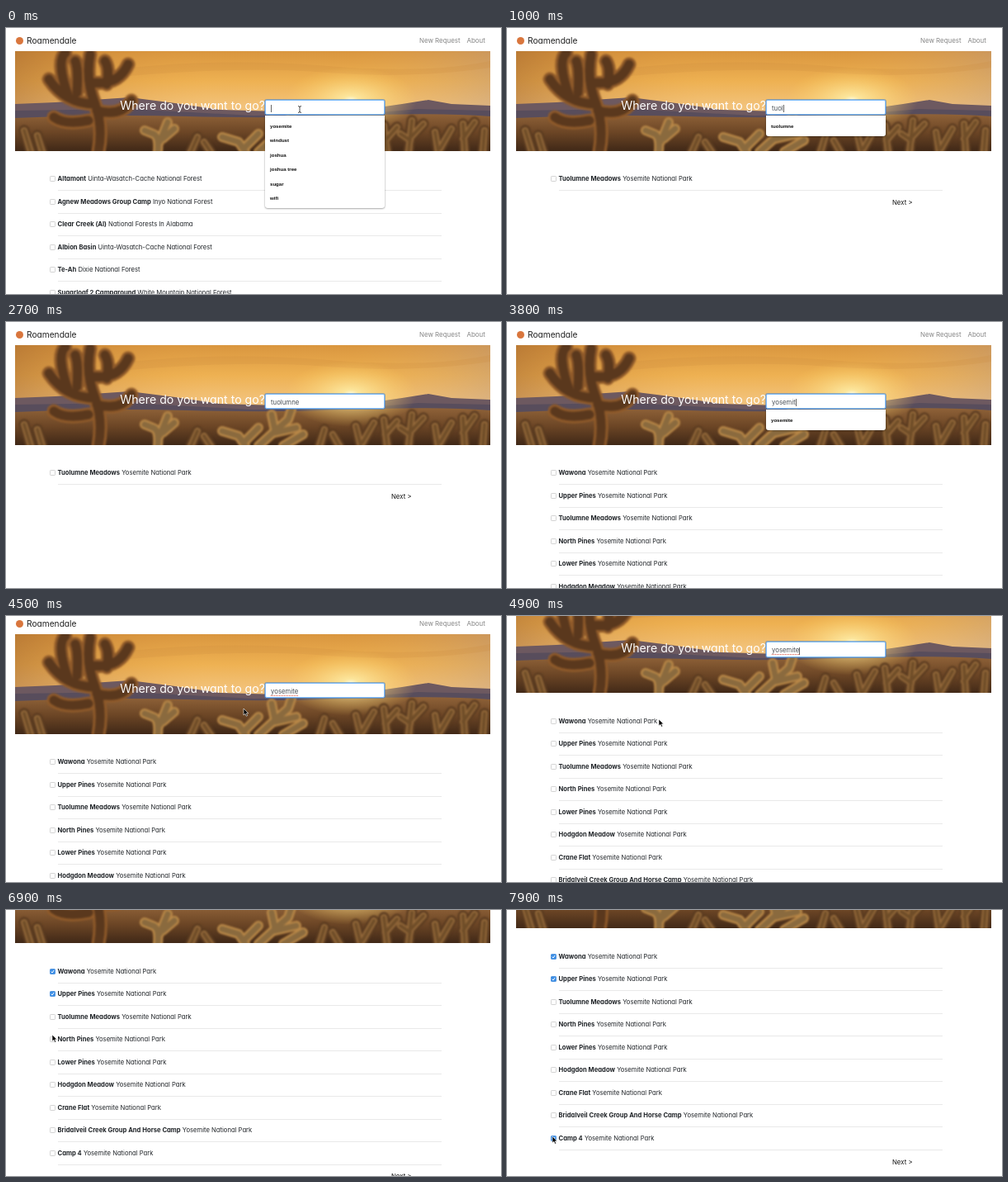
Write an HTML page that moves like this. It is 600 px wide and 322 px high and loops after 8000 ms.

```html
<!DOCTYPE html>
<html lang="en">
<head>
<meta charset="utf-8">
<title>Campground search</title>
<style>
html, body { margin: 0; width: 100%; height: 100%; overflow: hidden; background: #fff; }
#stage { position: relative; width: 600px; height: 322px; overflow: hidden;
  font: 7.65px Inter, "Open Sans", sans-serif; font-feature-settings: "cv11"; color: #212529; }
#page, #page > *, .row > *, #cursor, #beam { position: absolute; white-space: nowrap; }
#page { left: 0; top: 0; width: 600px; height: 500px; }
.nav { top: 5px; line-height: 20px; font-size: 7.9px; color: #858585; }
#brand { left: 25px; font-size: 10.2px; color: #222; }
#logo { left: 12px; top: 10.5px; width: 9px; height: 9px; border-radius: 50%; background: #d9763d; }
#photo { left: 11px; top: 28px; width: 576px; height: 120.5px; }
#ask { right: 286px; top: 84px; line-height: 20px; font-size: 14.15px; color: #fff; }
#field { left: 314px; top: 86.5px; width: 145px; height: 18.5px; box-sizing: border-box; padding-left: 6px;
  border: .5px solid #ced4da; border-radius: 2px; background: #fff; line-height: 18px; font-size: 7.8px; color: #495057; }
#field.focus { border-color: #80bdff; box-shadow: 0 0 0 1px rgba(70, 130, 200, .55); }
#typed.spell { text-decoration: underline dotted #e0533f 1px; text-underline-offset: 1.5px; }
#caret { display: inline-block; width: .7px; height: 9px; background: #666; vertical-align: middle; }
#list { left: 0; top: 0; }
#menu { left: 314px; top: 106px; width: 145px; box-sizing: border-box; padding: 4px 0 3.6px 6px; background: #fff;
  border-radius: 0 0 3px 3px; box-shadow: 0 .5px 2px rgba(0, 0, 0, .5);
  font: bold 6.1px/17.4px "Liberation Sans", Arial, sans-serif; color: #111; }
.row { position: absolute; left: 0; width: 600px; height: 27.5px; }
.row svg { left: 52.5px; top: 10px; width: 7px; height: 7px; }
.row span { left: 62.5px; top: 0; line-height: 27.5px; }
.row hr { left: 63px; top: 27px; width: 465px; height: 1px; margin: 0; border: 0; background: #e9e9e9; }
#next { left: 467px; line-height: 20px; font-size: 7.8px; color: #111; }
</style>
</head>
<body>
<div id="stage">
  <div id="page">
    <div id="logo"></div>
    <div id="brand" class="nav">Roamendale</div>
    <div class="nav" style="left:501px">New Request</div>
    <div class="nav" style="left:558.5px">About</div>
    <svg id="photo" viewBox="11 28 576 120.5" preserveAspectRatio="none">
      <defs>
        <linearGradient id="sky" x2="0" y2="1">
          <stop stop-color="#d9963f"/><stop offset=".3" stop-color="#eeb152"/><stop offset=".55" stop-color="#f2c27a"/>
        </linearGradient>
        <linearGradient id="tint">
          <stop stop-color="#965a28" stop-opacity=".45"/><stop offset=".4" stop-color="#e8a040" stop-opacity="0"/>
          <stop offset=".7" stop-color="#e8b060" stop-opacity="0"/><stop offset="1" stop-color="#b99a86" stop-opacity=".4"/>
        </linearGradient>
        <linearGradient id="soil" x2="0" y2="1">
          <stop stop-color="#8f6238"/><stop offset=".5" stop-color="#6b4525"/><stop offset="1" stop-color="#402817"/>
        </linearGradient>
        <radialGradient id="glow">
          <stop stop-color="#fffbe0"/><stop offset=".12" stop-color="#fff0a8" stop-opacity=".8"/>
          <stop offset="1" stop-color="#ffd060" stop-opacity="0"/>
        </radialGradient>
        <path id="tree" d="M112 150Q118 120 108 92Q96 62 102 32M108 92Q72 92 52 62M76 84Q60 40 72 30M104 66Q136 70 148 44M110 100Q140 108 152 88M86 78Q88 50 84 40M122 68Q126 50 120 40M100 112Q72 118 58 108"/>
        <path id="mid" d="M184 150Q186 130 178 128L168 124M186 138L196 114M190 134L204 122M290 150L282 138L262 132M288 146L306 128M306 150L326 132L322 112M326 132L342 118L346 106M326 134L352 128M336 150L360 136"/>
        <path id="far" d="M430 150L424 126M432 146L446 122M462 150L458 118M460 136L474 120M488 150L492 112M491 132L506 116M490 136L478 128M524 150L520 126M526 146L540 122M556 150L554 116M554 134L568 114M578 150L580 124M404 150L396 136M380 150L386 130M224 150L232 132M248 150L240 138M30 150L22 124M44 150L38 130"/>
      </defs>
      <path fill="url(#sky)" d="M11 28H587V149H11z"/>
      <path fill="url(#tint)" d="M11 28H587V149H11z"/>
      <path fill="#c9863f" opacity=".2" d="M150 48Q270 36 390 46T587 40V48Q490 62 390 54T150 58z"/>
      <path fill="#6d5960" d="M11 92L60 90L150 84L205 91L260 99L330 101L400 92L445 97L480 92L512 87L540 92L587 94V125H11z"/>
      <path fill="#50495a" opacity=".7" d="M11 100L150 98L300 106L430 104L500 98L587 100V125H11z"/>
      <path fill="url(#soil)" d="M11 109Q120 104 220 107T420 106T587 107V149H11z"/>
      <ellipse cx="418" cy="87" rx="80" ry="40" fill="url(#glow)"/>
      <g fill="none" stroke-linecap="round" stroke-linejoin="round" style="filter:blur(1px)">
        <g stroke-width="13"><use href="#far" stroke="#5a3b20"/></g>
        <g stroke-width="8"><use href="#far" stroke="#94693a"/></g>
        <g stroke-width="4"><use href="#far" stroke="#6f4d28"/></g>
        <g stroke-width="12"><use href="#mid" stroke="#b88747"/></g>
        <g stroke-width="7"><use href="#mid" stroke="#8a6a3e"/></g>
        <g stroke-width="17"><use href="#tree" stroke="#8f5a2a"/></g>
        <g stroke-width="11"><use href="#tree" stroke="#5a381d"/></g>
      </g>
    </svg>
    <div id="ask">Where do you want to go?</div>
    <div id="field"><span id="typed"></span><i id="caret"></i></div>
    <div id="list"></div>
    <div id="next">Next &gt;</div>
    <div id="menu"></div>
  </div>
  <svg id="cursor" width="9" height="12" style="overflow:visible">
    <path d="M0 0V8L1.9 6.3L3.2 9.2L4.6 8.6L3.3 5.8H5.8z" fill="#000" stroke="#fff" stroke-width=".6"/>
  </svg>
  <svg id="beam" width="6" height="10" style="left:353px;top:94px">
    <path d="M1 .5Q3 .5 3 2V7Q3 8.5 1 8.5M5 .5Q3 .5 3 2M3 7Q3 8.5 5 8.5" fill="none" stroke="#222" stroke-width=".8"/>
  </svg>
</div>
<script>
const $ = id => document.getElementById(id);
const LOOP = 8000, STEP = 100, PITCH = 27.5, TOP = 169.2;

const park = names => names.map(name => [name, "Yosemite National Park"]);
const lists = {
  all: [
    ["Altamont", "Uinta-Wasatch-Cache National Forest"],
    ["Agnew Meadows Group Camp", "Inyo National Forest"],
    ["Clear Creek (Al)", "National Forests In Alabama"],
    ["Albion Basin", "Uinta-Wasatch-Cache National Forest"],
    ["Te-Ah", "Dixie National Forest"],
    ["Sugarloaf 2 Campground", "White Mountain National Forest"]
  ],
  meadows: park(["Tuolumne Meadows"]),
  yosemite: park(["Wawona", "Upper Pines", "Tuolumne Meadows", "North Pines", "Lower Pines",
    "Hodgdon Meadow", "Crane Flat", "Bridalveil Creek Group And Horse Camp", "Camp 4"])
};
const hints = ["yosemite", "windust", "joshua", "joshua tree", "sugar", "wifi", "tuolumne"];

// Time of each key press for the two searches
const searches = [
  ["tuolumne", [300, 500, 700, 1000, 1200, 1400, 1600, 1800]],
  ["yosemite", [3000, 3100, 3300, 3400, 3600, 3700, 3800, 3900]]
];
// The last letter of "yosemit" and "tuol" are on screen at the press time itself
const ticks = { "Wawona": 5900, "Upper Pines": 6300, "Camp 4": 7800 };
const scrollKeys = [[4400, 0], [4900, 55.3], [5500, 55.3], [5800, 58], [6500, 58], [7100, 126.3]];
const pointerKeys = [[4400, 300, 110], [4900, 183.5, 125], [5200, 183.5, 125], [5700, 55.5, 122],
  [6000, 55.5, 122], [6200, 55.5, 151], [7200, 55.5, 151], [7700, 54.5, 274]];

function ease(keys, t) {
  const i = keys.findIndex(k => k[0] > t);
  if (i < 0) return keys[keys.length - 1].slice(1);
  if (i === 0) return keys[0].slice(1);
  const a = keys[i - 1], b = keys[i], u = (t - a[0]) / (b[0] - a[0]);
  return a.slice(1).map((v, j) => v + (b[j + 1] - v) * u * u * (3 - 2 * u));
}

function typing(t) {
  const [word, times] = searches[t < 3000 ? 0 : 1];
  const count = times.filter(k => k <= t).length;
  return { text: word.slice(0, count), last: count ? times[count - 1] : 0 };
}

function rowHTML([name, forest], i, t) {
  const on = t >= ticks[name];
  return `<div class="row" style="top:${TOP + i * PITCH}px">
    <svg viewBox="0 0 7 7"><rect x=".4" y=".4" width="6.2" height="6.2" rx="1.2"
      fill="${on ? "#3b8ee6" : "#fff"}" stroke="${on ? "#2f7fd6" : "#bbb"}" stroke-width=".7"/>
      ${on ? '<path d="M1.7 3.6L3 5L5.2 1.9" fill="none" stroke="#fff" stroke-width="1"/>' : ""}</svg>
    <span><b>${name}</b> ${forest}</span><hr></div>`;
}

const show = (id, on) => $(id).style.visibility = on ? "visible" : "hidden";

function render(t) {
  const { text, last } = typing(t), focused = t < 5900;
  $("typed").textContent = text;
  $("typed").className = t >= 4300 && focused ? "spell" : "";
  $("field").className = focused ? "focus" : "";
  show("caret", focused && (t - last) % 1000 < 500);

  show("menu", t < 2100 || t >= 3000 && t < 4200);
  $("menu").innerHTML = hints.filter(h => h.startsWith(text)).slice(0, 6).map(h => `<div>${h}</div>`).join("");

  const rows = lists[t >= 3300 ? "yosemite" : t >= 800 && t < 3000 ? "meadows" : "all"];
  $("list").innerHTML = rows.map((r, i) => rowHTML(r, i, t)).join("");
  $("next").style.top = TOP + rows.length * PITCH + 4.3 + "px";
  show("next", rows !== lists.all);

  $("page").style.top = -ease(scrollKeys, t)[0] + "px";
  const [x, y] = ease(pointerKeys, t);
  $("cursor").style.left = x + "px";
  $("cursor").style.top = y + "px";
  show("cursor", t >= 4400);
  show("beam", t < 300);
}

let shown = -1;
function tick() {
  const t = Math.floor(performance.now() % LOOP / STEP) * STEP;
  if (t !== shown) render(shown = t);
  requestAnimationFrame(tick);
}
tick();
</script>
</body>
</html>
```
